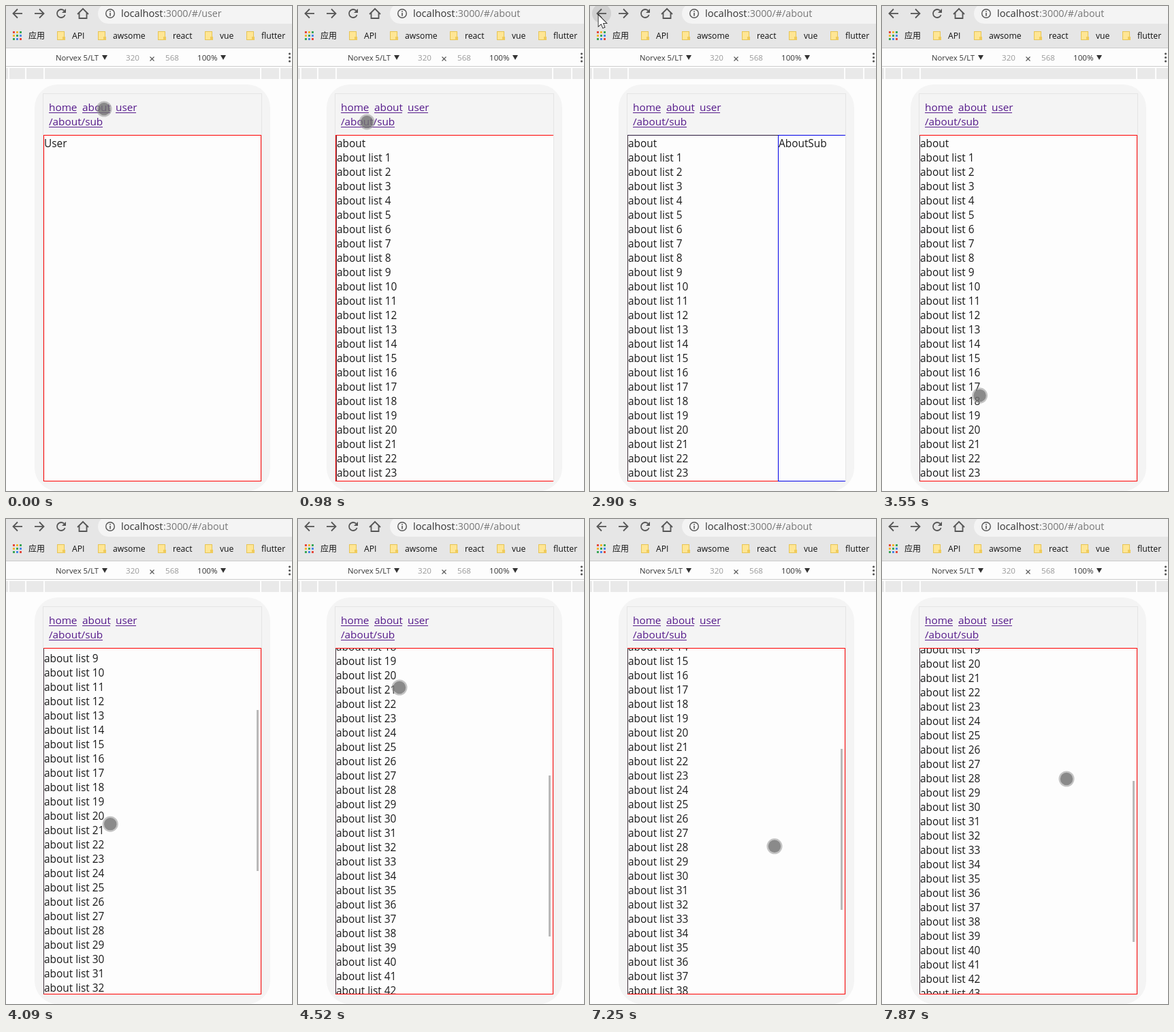
These frames come from a looping animation (420 by 711 pixels, 8000 ms). An HTML page with a canvas:

```html
<!DOCTYPE html>
<html lang="en">
<head>
<meta charset="utf-8">
<style>
html, body { margin: 0; width: 100%; height: 100%; overflow: hidden; background: #fdfdfd; }
canvas { display: block; width: 420px; height: 711px; }
</style>
</head>
<body>
<canvas id="stage"></canvas>
<script>
const W = 420, H = 711, LOOP = 8000, SLIDE = 480;
const PANEL = { x: 55, y: 189, w: 320, h: 508 };
const ROW = 21, ITEMS = 50, DRAG_GAIN = 1.03;
const SANS = '"Open Sans", "Noto Sans", sans-serif';
const CJK = '"Noto Sans CJK SC", "Noto Sans CJK", sans-serif';
const INK = '#555', PAPER = '#fdfdfd', LINK = '#551a8b';

const canvas = document.getElementById('stage');
const g = canvas.getContext('2d');
const dpr = window.devicePixelRatio || 1;
canvas.width = W * dpr;
canvas.height = H * dpr;

const START = { x: 144, y: 151 }, BACK = { x: 12.5, y: 13.5 };
const MOVES = [
  { from: 20, to: 330, x: 133, y: 151 },
  { from: 580, to: 1000, x: 101, y: 170 },
  { from: 1360, to: 1740, x: 101, y: 194 },
  { from: 1980, to: 2600, ...BACK },
  { from: 2950, to: 3690, x: 157, y: 628 },
  { from: 3690, to: 4520, x: 149, y: 247, drag: true },
  { from: 4580, to: 4990, x: 105, y: 177 },
  { from: 5300, to: 5980, ...BACK },
  { from: 6420, to: 6860, x: 271, y: 397.5 },
  { from: 6960, to: 7260, x: 271, y: 480, drag: true },
  { from: 7290, to: 7700, x: 271, y: 381, drag: true }
];
const VISITS = [
  { at: 0, path: 'user', page: 'user', dir: 0 },
  { at: 540, path: 'about', page: 'about', dir: 1 },
  { at: 1300, path: 'about/sub', page: 'sub', dir: 1 },
  { at: 2706, path: 'about', page: 'about', dir: -1 },
  { at: 5230, path: 'about/sub', page: 'sub', dir: 1 },
  { at: 6385, path: 'about', page: 'about', dir: -1 }
];

const progress = (t, a, b) => Math.min(1, Math.max(0, (t - a) / (b - a)));
const smooth = p => p * p * (3 - 2 * p);

// cubic-bezier(.25, .1, .25, 1)
function ease(p) {
  if (p <= 0 || p >= 1) return p <= 0 ? 0 : 1;
  const curve = (s, a, b) => 3 * s * (1 - s) ** 2 * a + 3 * s * s * (1 - s) * b + s ** 3;
  let lo = 0, hi = 1;
  for (let i = 0; i < 20; i++) {
    const mid = (lo + hi) / 2;
    if (curve(mid, .25, .25) < p) lo = mid; else hi = mid;
  }
  return curve(lo, .1, 1);
}

// Dragging the pointer up scrolls the list by the same rule.
function gesture(t) {
  let { x, y } = START, scroll = 0;
  for (const m of MOVES) {
    const p = smooth(progress(t, m.from, m.to));
    const dy = (m.y - y) * p;
    x += (m.x - x) * p;
    y += dy;
    if (m.drag) scroll -= dy * DRAG_GAIN;
    if (p < 1) break;
  }
  return { x, y, scroll: Math.round(scroll) };
}

function rect(x, y, w, h, fill) {
  g.fillStyle = fill;
  g.fillRect(x, y, w, h);
}

function frame(x, y, w, h, color) {
  g.strokeStyle = color;
  g.lineWidth = 1;
  g.strokeRect(x + .5, y + .5, w - 1, h - 1);
}

function round(x, y, w, h, r, fill) {
  g.beginPath();
  g.roundRect(x, y, w, h, r);
  g.fillStyle = fill;
  g.fill();
}

function disc(x, y, r, fill) {
  g.beginPath();
  g.arc(x, y, r, 0, Math.PI * 2);
  g.fillStyle = fill;
  g.fill();
}

function arc(x, y, r, a, b, width) {
  g.beginPath();
  g.arc(x, y, r, a, b);
  g.strokeStyle = INK;
  g.lineWidth = width;
  g.stroke();
}

function trace(points) {
  g.beginPath();
  points.forEach(([x, y]) => g.lineTo(x, y));
}

function line(points, width = 1.8) {
  trace(points);
  g.strokeStyle = INK;
  g.lineWidth = width;
  g.stroke();
}

function shape(points, fill) {
  trace(points);
  g.closePath();
  g.fillStyle = fill;
  g.fill();
}

function text(str, x, y, size, color, family = SANS) {
  g.font = `${size}px ${family}`;
  g.fillStyle = color;
  g.fillText(str, x, y);
}

function arrow(x, y, dir) {
  line([[x - 7 * dir, y], [x + 6 * dir, y]]);
  line([[x, y - 6.5], [x + 6.5 * dir, y], [x, y + 6.5]]);
}

function caret(x) {
  shape([[x - 4, 72], [x + 4, 72], [x, 79]], '#333');
}

function bookmark(name, x) {
  const left = x - 22;
  rect(left, 37, 11, 13, '#ffe694');
  frame(left, 37, 11, 13, '#e6c455');
  rect(left + 8, 45, 4, 5, '#efcb5c');
  text(name, x, 48, 12.2, '#111');
}

function toolbar(path, hover) {
  rect(0, 0, W, 62, '#e6e6e6');
  round(135, -4, 320, 30, 15, '#f4f4f4');
  if (hover) disc(17, 11, 14, '#d0d0d0');
  arrow(17, 11, -1);
  arrow(49, 11, 1);

  arc(81, 11, 6, .35, Math.PI * 1.75, 1.8);
  shape([[88, 4], [88, 10], [82, 10]], INK);
  line([[105, 12], [113, 4], [121, 12]]);
  line([[107.5, 10], [107.5, 18], [118.5, 18], [118.5, 10]]);

  arc(153, 11, 6.3, 0, Math.PI * 2, 1.4);
  rect(152.2, 10, 1.6, 4.6, INK);
  rect(152.2, 7.2, 1.6, 1.6, INK);

  text('localhost', 169, 16, 14.7, '#333');
  text(':3000/#/' + path, 231, 16, 14.3, '#777');

  const hues = ['#e5483b', '#f2b52c', '#3aa757', '#4a86e8'];
  for (let i = 0; i < 9; i++) {
    const col = i % 3, row = (i - col) / 3;
    rect(10 + col * 5, 37 + row * 5, 3, 3, hues[(col + row) % 4]);
  }
  text('应用', 33, 48, 12, '#111', CJK);
  bookmark('API', 97);
  bookmark('awsome', 157);
  bookmark('react', 245);
  bookmark('vue', 314);
  bookmark('flutter', 375);
  rect(0, 61, W, 1, '#cbcbcb');
}

function deviceBar() {
  rect(0, 62, W, 27, PAPER);
  text('Norvex 5/LT', 73, 80, 11.3, '#333');
  text('320', 176, 80, 11.6, '#999');
  text('568', 234, 80, 11.6, '#999');
  text('100%', 281, 80, 11.6, '#333');
  line([[211.5, 74.5], [217.5, 80.5]], 1.1);
  line([[217.5, 74.5], [211.5, 80.5]], 1.1);
  caret(145);
  caret(319);
  for (let i = 0; i < 3; i++) disc(416.5, 70 + i * 5.5, 1.6, INK);

  rect(0, 88, W, 1, '#cccccc');
  rect(0, 91, W, 16, '#e9e9e9');
  [3, 28, 55, 373, 401].forEach(x => rect(x, 91, 2, 16, PAPER));
}

function link(str, x, y, w) {
  text(str, x, y, 15.3, LINK);
  rect(x, y + 2, w, 1, LINK);
}

function device() {
  round(42, 115, 346, 596, 34, '#f4f4f4');
  frame(54, 128, 322, 569, '#e5e5e5');
  link('home', 63, 154, 41);
  link('about', 112, 154, 41);
  link('user', 161, 154, 30);
  link('/about/sub', 63, 175, 79);
}

function aboutList(x, scroll, bar) {
  for (let i = 0; i <= ITEMS; i++) {
    text(i ? 'about list ' + i : 'about', x + 1, 207 + i * ROW - scroll, 15.4, '#1a1a1a');
  }
  const ratio = (PANEL.h - 2) / ((ITEMS + 1) * ROW + 10);
  const top = Math.round(PANEL.y + 3.5 + scroll * ratio);
  rect(x + 313, top, 3, 236, `rgba(130,130,130,${.55 * bar})`);
}

function page(name, dx, scroll, bar) {
  const { y, w, h } = PANEL, x = PANEL.x + dx;
  rect(x, y, w, h, PAPER);
  g.save();
  g.beginPath();
  g.rect(x + 1, y + 1, w - 2, h - 2);
  g.clip();
  if (name === 'about') aboutList(x, scroll, bar);
  else text(name === 'user' ? 'User' : 'AboutSub', x + 1, 207, 15.4, '#1a1a1a');
  g.restore();
  frame(x, y, w, h, name === 'sub' ? '#0000e6' : '#f00');
  if (name === 'about') rect(x, y + 1, 1, h - 2, '#4a3a44');
}

function view(t, index, scroll, bar) {
  const { at, page: name, dir } = VISITS[index];
  const p = ease(progress(t, at, at + SLIDE));
  g.save();
  g.beginPath();
  g.rect(PANEL.x, PANEL.y, PANEL.w, PANEL.h);
  g.clip();
  if (!dir || p === 1) page(name, 0, scroll, bar);
  else {
    const prev = VISITS[index - 1].page;
    const [under, over] = dir > 0 ? [prev, name] : [name, prev];
    page(under, 0, scroll, 0);
    if (dir < 0) rect(PANEL.x, PANEL.y, PANEL.w, 1, '#2b1a3c');
    page(over, Math.round(PANEL.w * (dir > 0 ? 1 - p : p)), scroll, 0);
  }
  g.restore();
}

function pointer(x, y) {
  if (x > 54 && x < 376 && y > 128 && y < 697) {
    disc(x, y, 11.5, 'rgba(150,150,150,.55)');
    disc(x, y, 9.2, 'rgba(100,100,100,.6)');
    return;
  }
  g.save();
  g.translate(x, y);
  const outline = new Path2D('M0 0V16L4 12.5L6.5 18.5L9 17.5L6.5 11.5H11.5Z');
  g.strokeStyle = '#111';
  g.lineWidth = 1.6;
  g.stroke(outline);
  g.fillStyle = '#fff';
  g.fill(outline);
  g.restore();
}

function barAlpha(t) {
  const first = progress(t, 3690, 3740) - progress(t, 4800, 4990);
  return first + progress(t, 6960, 7020);
}

function draw(t) {
  const { x, y, scroll } = gesture(t);
  const index = VISITS.filter(v => v.at <= t).length - 1;

  g.setTransform(dpr, 0, 0, dpr, 0, 0);
  rect(0, 0, W, H, PAPER);
  toolbar(VISITS[index].path, Math.hypot(x - 17, y - 11) < 14);
  deviceBar();
  device();
  view(t, index, scroll, barAlpha(t));
  pointer(x, y);
}

const begin = performance.now();
function tick() {
  draw((performance.now() - begin) % LOOP);
  requestAnimationFrame(tick);
}
tick();
</script>
</body>
</html>
```
